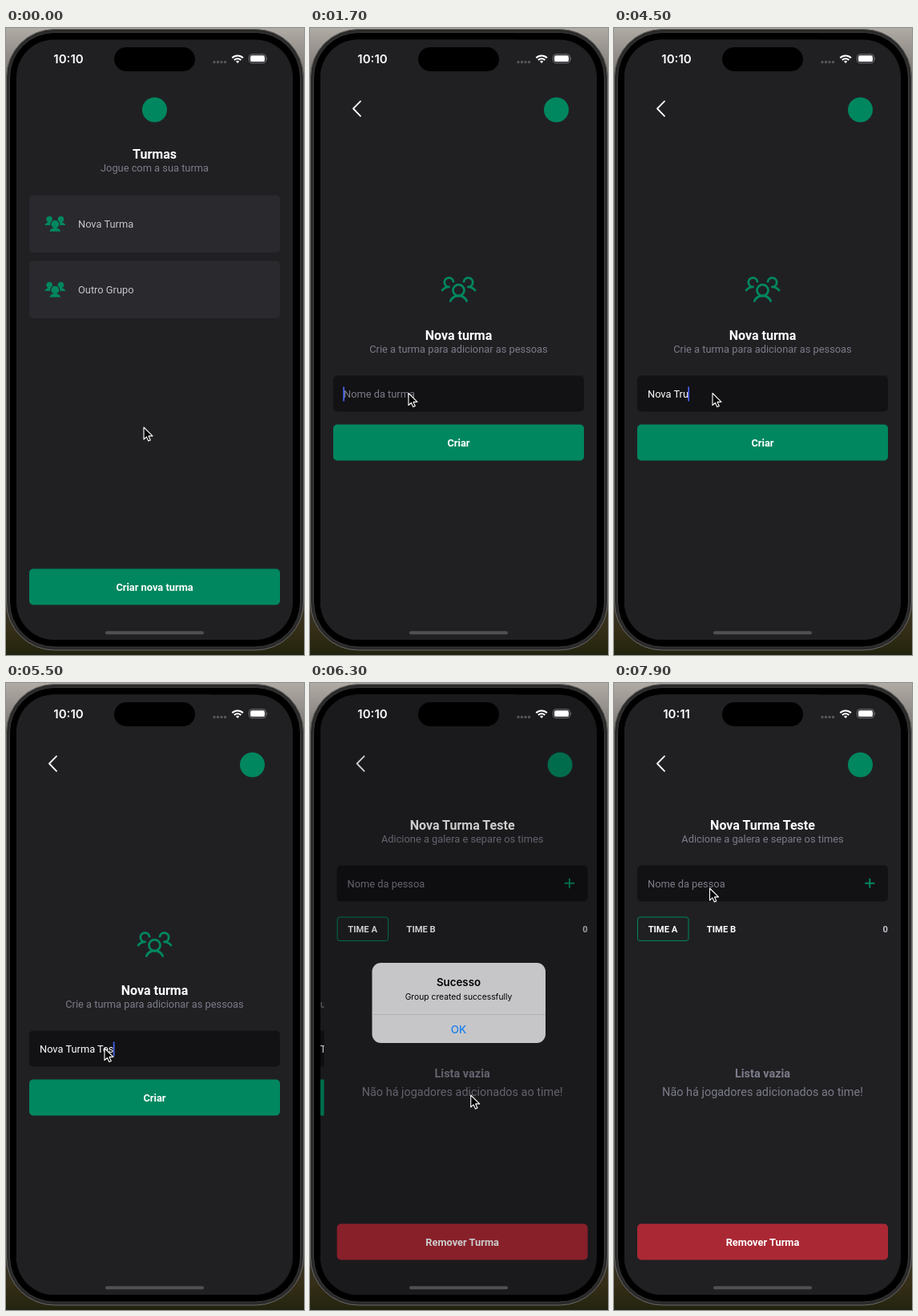
An HTML page that plays this animation: 372 by 782 pixels, repeating every 8 s.

```html
<!DOCTYPE html>
<html lang="pt-BR">
<head>
<meta charset="utf-8">
<title>Turmas</title>
<style>
  html, body { margin: 0; width: 100%; height: 100%; overflow: hidden; background: #222; }
  svg { display: block; }
  text { font: 12.84px Roboto, sans-serif; fill: #c4c4cc; white-space: pre; }
  .mid { text-anchor: middle; }
  .muted { fill: #7c7c8a; }
  .bold { font-weight: 700; fill: #fff; }
  .title { font-size: 16.05px; }
  .tab { font-size: 11.23px; }
  .empty { font-size: 14.44px; fill: #7c7c8a; }
  .ios { font-family: Inter, sans-serif; fill: #000; }
  .green { fill: #00875f; }
  .line { fill: none; stroke-linecap: round; stroke-linejoin: round; }
</style>
</head>
<body>
<svg width="372" height="782" viewBox="0 0 372 782">
  <defs>
    <linearGradient id="wall" x2="0" y2="1">
      <stop offset="0" stop-color="#b0aba5"/>
      <stop offset=".08" stop-color="#77736f"/>
      <stop offset=".9" stop-color="#3a3a34"/>
      <stop offset=".96" stop-color="#352d16"/>
      <stop offset="1" stop-color="#22240f"/>
    </linearGradient>
    <clipPath id="display"><rect x="13" y="14.5" width="345" height="748.5" rx="47"/></clipPath>
    <rect id="page" x="13" y="14" width="345" height="750" fill="#202023"/>
    <rect id="card" x="29" width="313" height="71.5" rx="5" fill="#29292e"/>
    <rect id="field" x="29" width="313" height="45" rx="5" fill="#121214"/>
    <rect id="button" x="29" width="313" height="45" rx="5"/>
    <rect id="caret" width="1.7" height="18" fill="#4a62f0"/>
    <path id="back" class="line" d="M63 91.3l-9 9.2 9 9.3" stroke="#fff" stroke-width="1.8"/>
    <circle id="badge" r="15.5" class="green"/>
    <g id="side">
      <circle cx="60" cy="82" r="36"/>
      <path d="M4 150a66 66 0 0 1 56-36h16a60 60 0 0 0-2 38H12q-8 0-8-2z"/>
    </g>
    <g id="people" class="green" transform="scale(.105) translate(-130 -134)">
      <use href="#side"/>
      <use href="#side" transform="translate(256) scale(-1 1)"/>
      <circle cx="128" cy="140" r="52" stroke="#29292e" stroke-width="10"/>
      <path d="M62 224a72 72 0 0 1 132 0q0 4-6 4H68q-6 0-6-4z"/>
    </g>
  </defs>

  <rect width="372" height="782" fill="url(#wall)"/>
  <rect x=".5" y="1.5" width="371" height="774.5" rx="60" fill="#2b2a2a" stroke="#6a6967"/>
  <rect x="4.5" y="5.5" width="363" height="766.5" rx="56" stroke="#3c3b3a"/>

  <g clip-path="url(#display)">
    <g id="groups">
      <use href="#page"/>
      <use href="#badge" x="185.5" y="102"/>
      <text class="mid bold title" x="185.5" y="163">Turmas</text>
      <text class="mid muted" x="185.5" y="179">Jogue com a sua turma</text>
      <use href="#card" y="208.5"/>
      <use href="#people" x="61.5" y="244"/>
      <text x="90" y="248.5">Nova Turma</text>
      <use href="#card" y="290.5"/>
      <use href="#people" x="61.5" y="326"/>
      <text x="90" y="330.5">Outro Grupo</text>
      <g id="newButton">
        <use href="#button" y="674.5" fill="#00875f"/>
        <text class="mid bold" x="185.5" y="701.5">Criar nova turma</text>
      </g>
    </g>

    <g id="create">
      <use href="#page"/>
      <use href="#back"/>
      <use href="#badge" x="307.5" y="102"/>
      <g class="line" stroke="#00875f" stroke-width="16" transform="translate(185.5 325) scale(.176) translate(-128 -128)">
        <circle cx="128" cy="140" r="40"/>
        <path d="M196 116a60 60 0 0 1 48 24M12 140a60 60 0 0 1 48-24M70 216a64 64 0 0 1 116 0M60 116A32 32 0 1 1 91 78M165 78A32 32 0 1 1 196 116"/>
      </g>
      <text class="mid bold title" x="185.5" y="388.5">Nova turma</text>
      <text class="mid muted" x="185.5" y="404.5">Crie a turma para adicionar as pessoas</text>
      <use href="#field" y="433.5"/>
      <text id="hint" class="muted" x="42" y="460.5">Nome da turma</text>
      <text id="name" x="42" y="460.5" style="fill:#fff"></text>
      <use id="nameCaret" href="#caret" y="447.5"/>
      <g id="createButton">
        <use href="#button" y="494.5" fill="#00875f"/>
        <text class="mid bold" x="185.5" y="521.5">Criar</text>
      </g>
    </g>

    <g id="players">
      <use href="#page"/>
      <use href="#back"/>
      <use href="#badge" x="307.5" y="102"/>
      <text class="mid bold title" x="185.5" y="182.5">Nova Turma Teste</text>
      <text class="mid muted" x="185.5" y="198.5">Adicione a galera e separe os times</text>
      <use href="#field" y="227.5"/>
      <text class="muted" x="42" y="254.5">Nome da pessoa</text>
      <use id="personCaret" href="#caret" x="41.3" y="241.5"/>
      <path class="line" d="M314 249.7h10.6M319.3 244.4v10.6" stroke="#00875f" stroke-width="1.9"/>
      <rect x="29.5" y="292" width="63.5" height="29.5" rx="3" fill="none" stroke="#00875f"/>
      <text class="mid bold tab" x="61" y="310.5">TIME A</text>
      <text class="mid bold tab" x="134" y="310.5">TIME B</text>
      <text class="bold tab" x="342" y="310.5" text-anchor="end" style="fill:#c4c4cc">0</text>
      <text class="mid bold empty" x="185.5" y="491.5">Lista vazia</text>
      <text class="mid empty" x="185.5" y="515">Não há jogadores adicionados ao time!</text>
      <use href="#button" y="674.5" fill="#aa2834"/>
      <text class="mid bold" x="185.5" y="701.5">Remover Turma</text>
    </g>

    <g id="dialog">
      <path d="M13 14h345v750H13z" opacity=".2"/>
      <g id="alert">
        <rect x="77.5" y="349" width="216.5" height="100" rx="11" fill="#c6c6c9"/>
        <path d="M77.5 413.5h216.5" stroke="#a9a9ad" stroke-width=".7"/>
        <text class="mid ios" x="185.5" y="378" style="font-size:13.3px;font-weight:600">Sucesso</text>
        <text class="mid ios" x="185.5" y="394.5" style="font-size:10.3px">Group created successfully</text>
        <text class="mid ios" x="185.5" y="436.5" style="font-size:13.5px;font-weight:500;fill:#1a7fee">OK</text>
      </g>
    </g>
  </g>

  <rect x="135" y="24" width="101" height="30" rx="15"/>
  <text id="clock" class="mid ios" x="78" y="43.7" style="font-size:15px;font-weight:600;fill:#fff"></text>
  <path class="line" d="M260 42.5h14" stroke="#58585c" stroke-width="3.4" stroke-dasharray="0 4.5"/>
  <g class="line" stroke="#fff" stroke-width="2.1" style="stroke-linecap:butt">
    <path d="M282.3 37.3a9.5 9.5 0 0 1 13.6 0M284.9 40a6 6 0 0 1 8.4 0"/>
    <path d="M289.1 44l-2.1-2.3a3 3 0 0 1 4.2 0z" fill="#fff" stroke="none"/>
  </g>
  <rect x="303.5" y="32.8" width="21" height="10.8" rx="3.4" fill="none" stroke="#77777b"/>
  <rect x="305" y="34.3" width="18" height="7.8" rx="2.2" fill="#fff"/>
  <path d="M325.6 36.3q1.8 1.8 0 3.7z" fill="#77777b"/>
  <rect x="124" y="752.3" width="123" height="4" rx="2" fill="#505053"/>

  <g id="pointer">
    <g id="ring" fill="none" stroke="#fff" stroke-width="1.3" transform="translate(.3 1.3)">
      <circle r="20" stroke="#000" stroke-width="4"/>
      <circle r="22"/><circle r="18"/>
    </g>
    <path d="M0 0v15l3.4-3.1 2.4 5.2 2.5-1.1-2.3-5.1H11z" stroke="#fff" stroke-width="1.1" stroke-linejoin="round"/>
  </g>
</svg>
<script>
const LOOP = 8000, WIDTH = 345, PARALLAX = 103;
const ui = {};
document.querySelectorAll('[id]').forEach(el => ui[el.id] = el);

const clamp = v => Math.max(0, Math.min(1, v));
const ramp = (t, from, to) => clamp((t - from) / (to - from));
const ease = p => p * p * (3 - 2 * p);
const within = (t, from, to) => t >= from && t < to;
const fade = (el, v) => el.setAttribute('opacity', v);
const move = (el, x, y = 0) => el.setAttribute('transform', `translate(${x} ${y})`);

// Critically damped spring of a navigation push
function push(t) {
  if (t <= 0) return 0;
  const k = t * .045;
  return k > 12 ? 1 : 1 - (1 + k) * Math.exp(-k);
}

// Each leg: start time, end time, destination
const legs = [
  [50, 620, 189.5, 702], [950, 1480, 123, 455.5], [5870, 6040, 200.7, 520.5],
  [6150, 6280, 200.7, 514], [6320, 6740, 186, 432], [6900, 7440, 119.5, 256]
];
const clicks = [[620, 760], [1480, 1580], [6040, 6140], [6740, 6840], [7440, 7540]];

function pointerAt(t) {
  let x = 172, y = 498;
  for (const [from, to, tx, ty] of legs) {
    const p = ease(ramp(t, from, to));
    x += (tx - x) * p;
    y += (ty - y) * p;
  }
  return [x, y];
}

function typed(t) {
  const steps = from => Math.floor((t - from) / 100);
  if (t < 3200) return '';
  if (t < 3700) return 'Nova'.slice(0, steps(3100));
  if (t < 4500) return 'Nova Truma'.slice(0, 5 + steps(3700));
  if (t < 4600) return 'Nova Tru';
  if (t < 4800) return 'Nova T';
  return 'Nova Turma Teste'.slice(0, t < 5900 ? Math.min(15, 7 + steps(4800)) : 16);
}

function blink(t) {
  const phase = t % 400;
  return 1 - ramp(phase, 170, 270) + ramp(phase, 330, 390);
}

const pressed = (t, from, to) => within(t, from, to) ? .2 : .2 + .8 * (t < from ? 1 : ramp(t, to, to + 100));

function draw(t) {
  const first = push(t - 783), second = push(t - 6161);
  move(ui.groups, -PARALLAX * first);
  move(ui.create, WIDTH * (1 - first) - PARALLAX * second);
  move(ui.players, WIDTH * (1 - second));

  fade(ui.newButton, pressed(t, 640, 810));
  fade(ui.createButton, pressed(t, 6050, 6150));

  const name = typed(t);
  ui.name.textContent = name;
  fade(ui.hint, name ? 0 : 1);
  ui.nameCaret.setAttribute('x', 41.3 + (name ? ui.name.getComputedTextLength() : 0));
  fade(ui.nameCaret, t < 1600 ? 0 : name ? 1 : blink(t - 1300));
  fade(ui.personCaret, t < 7600 ? 0 : blink(t - 7600));

  const shown = ease(ramp(t, 6160, 6290));
  const scale = 1.2 - .2 * shown;
  fade(ui.dialog, shown * (1 - ramp(t, 6840, 6960)));
  ui.alert.setAttribute('transform', `translate(185.5 399) scale(${scale}) translate(-185.5 -399)`);

  ui.clock.textContent = t < 7200 ? '10:10' : '10:11';
  move(ui.pointer, ...pointerAt(t));
  fade(ui.ring, clicks.some(([from, to]) => within(t, from, to)) ? 1 : 0);
}

const start = performance.now();
(function frame() {
  draw((performance.now() - start) % LOOP);
  requestAnimationFrame(frame);
})();
</script>
</body>
</html>
```
